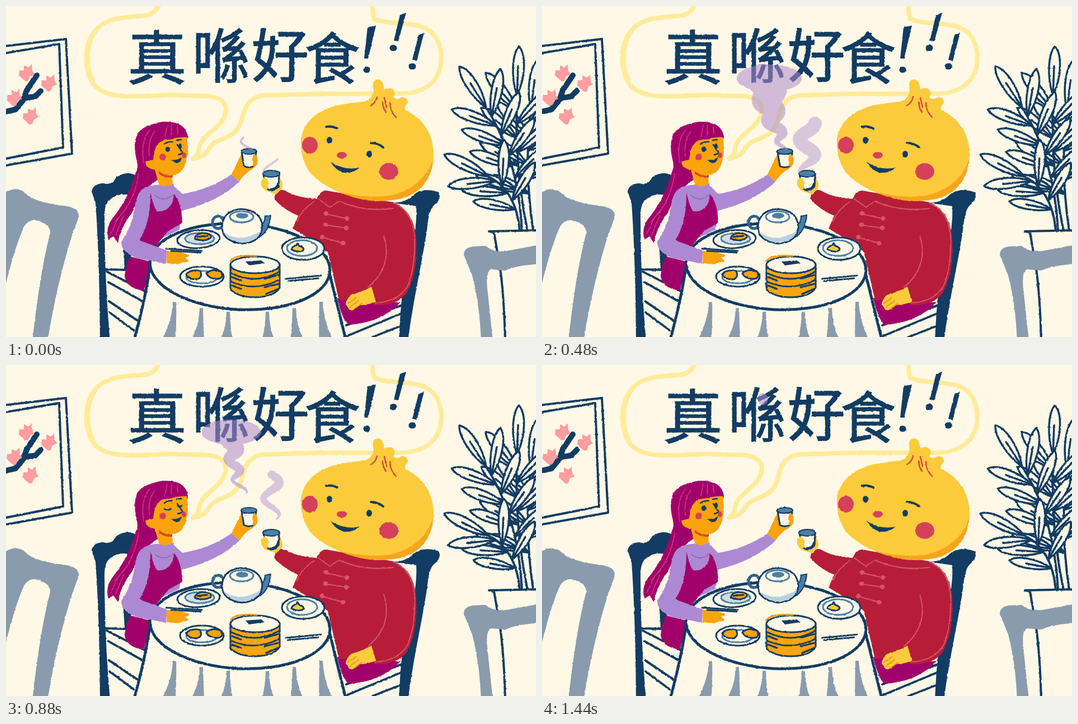
Write an HTML page that moves like this. It is 947 px wide and 592 px high and loops after 1.48 s.

```html
<!DOCTYPE html>
<html lang="zh-HK">
<head>
<meta charset="utf-8">
<title>Tea time</title>
<style>
  html, body { margin: 0; width: 100%; height: 100%; overflow: hidden; background: #fff8e6; }
  svg { display: block; width: 100vw; height: 100vh; }
  path, ellipse { stroke-linecap: round; stroke-linejoin: round; }
  .navy { fill: #123c63; }
  .grey { fill: #8a9bae; }
  .line { fill: none; stroke: #123c63; stroke-width: 4; }
  .paper { fill: #fff8e6; stroke: #123c63; stroke-width: 4; }
  .thin { stroke-width: 3; }
  .thick { stroke-width: 5; }
  .bubble { fill: none; stroke: #ffeb99; stroke-width: 8; }
  .skin { fill: #fba30a; }
  .bun { fill: #fccb3b; }
  .plum { fill: #a1006b; }
  .lilac { fill: #ad89d3; }
  .red { fill: #b71d38; }
  .seam { fill: none; stroke: #d5566b; stroke-width: 2; }
  .cheek { fill: #d6405a; }
  .blue { fill: #4c7fa6; }
  .steam { fill: #ae8bce; }
  text { font-family: "Noto Sans CJK HK", "Noto Sans CJK TC", "Noto Sans CJK JP", "Noto Sans CJK", sans-serif;
    fill: #123c63; stroke: #123c63; stroke-width: 1.5; text-anchor: middle; }
</style>
</head>
<body>
<svg viewBox="0 0 947 592" preserveAspectRatio="none">
  <defs>
    <filter id="rough" filterUnits="userSpaceOnUse" x="-10" y="-10" width="967" height="612" color-interpolation-filters="sRGB">
      <feTurbulence id="noise" type="fractalNoise" baseFrequency=".22" numOctaves="2" seed="1"/>
      <feDisplacementMap in="SourceGraphic" scale="2.6" xChannelSelector="R" yChannelSelector="G"/>
    </filter>
    <path id="blossom" fill="#ff9da0" d="M-1,15 L-13,4 L-12,-5 L-4,-5 L-4,-14 L4,-10 L10,-16 L11,-4 L15,2 L7,6 L4,14 Z"/>
  </defs>
  <g filter="url(#rough)">
    <!-- speech bubble -->
    <path class="bubble" d="M276,-8 Q268,14 250,17 C213,20 183,20 163,40 C138,65 138,115 158,142 C183,168 230,162 290,159 L355,161 C390,162 398,178 390,198 C380,222 345,232 345,258 Q343,268 334,273 C368,268 355,250 382,240 C424,226 418,205 428,182 Q437,163 460,160 L560,157 H700 C745,157 768,140 776,110 C782,80 773,52 750,40 C725,28 685,34 658,23 Q654,12 655,-8"/>
    <path class="bubble" d="M160,45 C142,68 142,105 154,132"/>
    <text x="270" y="131" font-size="105">真</text>
    <text x="384" y="129" font-size="104">喺</text>
    <text x="490" y="127" font-size="103">好</text>
    <text x="583" y="131" font-size="100">食</text>
    <path class="navy" d="M646,38 L661,35 L647,94 L640,94 Z M704,16 L715,12 L701,63 L693,62 Z M737,52 L747,48 L734,98 L726,96 Z"/>
    <path class="line" style="stroke-width:11" d="M644,114 h1 M691,75 h2 M725,108 h2"/>

    <!-- wall picture -->
    <path class="line" d="M-5,72 L107,59 L118,264 L-5,286 M-5,85 L95,68 L102,253 L-5,274"/>
    <path class="line" style="stroke-width:10" d="M-5,190 L17,185 L31,168 L37,151 L55,124 M36,164 L52,162 L62,152"/>
    <use href="#blossom" x="36" y="120"/><use href="#blossom" x="76" y="138"/>
    <use href="#blossom" x="14" y="164"/><use href="#blossom" x="43" y="197"/>

    <!-- plant -->
    <g id="plant"></g>
    <path class="paper" d="M863,403 L955,401 V600 H892 Q890,520 883,470 L872,405 Z"/>

    <!-- empty chairs -->
    <path class="grey" d="M-8,340 Q15,318 35,335 Q48,350 100,357 Q135,360 129,380 L118,410 Q90,500 74,600 H47 Q60,480 78,410 Q83,394 60,385 Q42,378 32,395 Q12,440 -8,530 Z"/>
    <path class="grey" d="M818,445 Q818,432 835,430 L857,429 Q872,443 900,437 L955,427 V461 Q910,464 893,473 L866,471 Q857,476 860,505 L870,600 H849 Q846,530 833,482 Z"/>

    <!-- occupied chairs -->
    <path class="navy" d="M153,332 Q155,318 174,317 Q190,322 197,306 Q222,290 240,310 L228,340 Q203,332 187,345 Q176,352 176,375 Q176,490 186,600 H168 Q167,450 160,352 Z M209,425 L224,440 L221,475 L212,470 Z"/>
    <path class="line" d="M178,471 L214,472 M180,475 L248,510 M183,494 L242,527 M184,528 L234,562 M185,548 L228,580"/>
    <path class="navy" d="M690,352 Q715,352 729,337 Q747,324 773,333 Q779,345 766,355 Q757,362 754,385 C748,440 728,520 718,600 H702 Q704,540 712,480 Q736,405 733,358 Z"/>
    <path class="line" d="M608,571 L708,535 M610,590 L706,550 M655,592 L706,572"/>

    <!-- woman -->
    <path class="plum" d="M236,285 Q225,250 235,228 Q250,208 292,208 Q322,210 325,238 L270,250 L272,310 Q240,330 225,370 Q205,395 200,424 L192,412 L183,418 Q177,398 190,380 Q215,350 228,310 Z"/>
    <path class="lilac" d="M245,327 Q265,315 300,322 L315,336 Q365,328 403,301 L417,314 Q380,350 314,366 L310,400 L255,427 L287,437 L286,461 L235,451 Q205,440 206,422 Q225,395 230,360 Q234,333 245,327 Z"/>
    <path class="plum" d="M258,333 Q263,358 270,367 Q288,370 298,350 L300,336 Q314,352 315,388 L290,402 L262,436 L239,418 Q259,385 258,333 Z M222,448 L262,458 L246,509 Q215,505 212,483 Q214,463 222,448 Z"/>
    <path class="skin" d="M262,240 L323,234 Q327,260 323,272 Q319,300 297,303 L298,318 Q283,327 273,318 L266,293 Q249,290 249,279 Q253,270 261,275 Z"/>
    <path fill="#d64a2a" d="M273,295 Q285,305 298,303 L298,307 Q282,308 273,300 Z"/>
    <path class="lilac" d="M266,320 Q283,327 300,317 L298,340 Q280,352 266,340 Z"/>
    <path fill="none" stroke="#8f62b8" stroke-width="1.5" d="M266,338 Q282,352 298,338"/>
    <path class="plum" d="M233,262 Q228,215 280,207 Q322,205 325,235 L309,233 L299,238 L281,240 Q265,245 263,275 L249,278 L252,300 L236,302 Z"/>
    <path fill="none" stroke="#d23c78" stroke-width="1.5" d="M288,213 L284,234 M296,213 L295,231 M306,216 L307,228 M266,224 Q253,240 256,268 M257,222 Q240,240 246,280 M237,300 Q230,345 207,372 M230,330 Q220,360 194,386 M210,375 L196,410 M200,380 L187,408"/>
    <path class="line" style="stroke-width:2.5" d="M283,247 Q289,242 297,243 M305,240 L313,239 M306,248 L316,263 L308,266"/>
    <path class="navy" d="M294,275 Q303,277 314,271 Q313,281 304,281 Z"/>
    <ellipse class="cheek" cx="280" cy="270" rx="6" ry="6"/>
    <ellipse class="cheek" cx="318" cy="267" rx="4" ry="5"/>
    <g id="open"><ellipse class="navy" cx="289" cy="256" rx="4" ry="5"/><ellipse class="navy" cx="311" cy="251" rx="3" ry="5"/></g>
    <path id="closed" class="line" style="stroke-width:2.5" d="M283,257 Q289,262 295,257 M307,252 Q311,256 315,251"/>
    <path class="skin" d="M403,301 Q410,287 416,274 L422,262 L442,261 Q449,264 449,275 Q451,286 438,293 Q425,301 417,314 Z"/>
    <path class="paper thin" d="M421,261 L447,261 L444,286 Q433,291 425,286 Z"/>
    <ellipse class="blue" cx="434" cy="260" rx="14" ry="5" stroke="#123c63" stroke-width="2"/>
    <path class="skin" d="M443,265 Q450,266 449,275 Q451,284 443,288 Q439,284 442,279 Q438,275 443,265 Z"/>

    <!-- bun guest -->
    <path class="plum" d="M592,522 L655,528 L705,530 Q670,567 612,570 Q600,560 592,522 Z"/>
    <path class="red" d="M482,334 Q490,326 500,331 Q520,343 555,345 Q560,332 572,330 L692,351 Q728,365 733,415 Q736,480 715,515 Q695,538 657,535 L654,506 Q625,526 595,526 L575,440 Q550,420 512,398 L522,375 Q497,365 479,345 Z"/>
    <path class="bun" d="M527,237 Q535,193 590,178 Q625,172 640,171 Q655,166 657,151 Q652,132 665,131 Q677,134 675,150 Q680,145 690,148 Q697,154 692,164 Q700,169 707,163 Q718,163 718,173 Q711,180 713,186 C755,205 770,245 762,287 C752,332 710,350 660,349 C620,346 570,327 545,300 Q525,275 527,237 Z"/>
    <path fill="#f5a51c" d="M763,275 Q758,330 705,345 Q645,356 594,332 Q640,345 687,339 Q745,325 763,275 Z"/>
    <path fill="none" stroke="#d94a45" stroke-width="2.5" d="M663,163 Q660,174 652,178 M673,172 Q673,181 679,190 M676,164 L680,181 M686,173 Q686,188 697,199"/>
    <ellipse class="cheek" cx="543" cy="249" rx="14" ry="15"/>
    <ellipse class="cheek" cx="684" cy="296" rx="17" ry="15"/>
    <ellipse class="cheek" cx="600" cy="267" rx="9" ry="6"/>
    <ellipse class="navy" cx="578" cy="240" rx="5" ry="6"/>
    <ellipse class="navy" cx="649" cy="265" rx="5" ry="6"/>
    <path class="line" d="M572,216 Q582,214 592,219 M652,245 Q665,245 674,253"/>
    <path class="navy" d="M580,279 Q604,295 632,289 Q620,300 603,298 Q588,293 580,279 Z"/>
    <path class="red" d="M558,344 Q560,331 572,330 Q592,338 605,350 Q650,358 692,351 L691,366 Q645,366 610,357 L595,349 L579,360 Z"/>
    <path class="seam" d="M558,345 L579,360 L595,349 Q640,369 692,362 M550,350 Q528,365 520,385 M675,411 Q692,465 647,503 M692,352 Q725,365 730,410 Q732,465 718,500 Q702,528 662,531 M650,505 L660,532 M568,371 L612,381 M568,391 L612,398 M562,413 L606,425"/>
    <path class="seam" style="stroke-width:8" d="M572,371 h.1 M609,380 h.1 M571,391 h.1 M608,397 h.1 M565,413 h.1 M602,424 h.1"/>
    <path class="bun" d="M653,502 L661,529 Q645,535 633,535 L620,544 Q612,545 611,539 L607,534 Q607,526 616,517 Q635,512 653,502 Z"/>
    <path fill="none" stroke="#e89512" stroke-width="2" d="M611,532 L625,522 M614,539 L630,527 M622,542 L636,532"/>
    <path class="bun" d="M463,305 Q455,310 456,320 Q460,331 472,333 L483,337 L493,326 Q496,315 488,306 Z"/>
    <path class="paper thin" d="M460,302 L488,302 L487,323 Q475,335 466,326 Z"/>
    <path class="line" d="M486,318 Q484,328 473,328"/>
    <ellipse class="blue" cx="474" cy="300" rx="15" ry="6" stroke="#123c63" stroke-width="2"/>
    <path class="bun" d="M460,307 Q467,307 467,312 Q472,316 468,321 Q471,327 464,328 Q455,322 456,313 Z"/>

    <!-- table -->
    <path class="paper thick" d="M258,462 Q248,530 228,600 H608 Q592,535 578,478 Z"/>
    <g id="folds" class="grey"></g>
    <ellipse class="paper thick" cx="418" cy="466" rx="161" ry="77" transform="rotate(3 418 466)"/>
    <g class="paper thin">
      <ellipse cx="344" cy="417" rx="38" ry="16" transform="rotate(-4 344 417)"/>
      <ellipse cx="346" cy="416" rx="26" ry="10" fill="#d3dde2" stroke="#4c7fa6"/>
      <path class="skin" d="M338,417 Q336,409 350,406 Q368,406 366,414 Q358,422 338,417 Z M342,413 L360,411"/>
      <ellipse cx="531" cy="434" rx="38" ry="20"/>
      <ellipse cx="529" cy="433" rx="27" ry="14" stroke="#4c7fa6"/>
      <path class="bun" d="M510,435 Q512,429 519,428 L521,424 L524,429 Q534,432 531,437 Q520,442 510,435 Z"/>
      <ellipse cx="350" cy="484" rx="39" ry="18"/>
      <ellipse cx="350" cy="485" rx="28" ry="11" stroke="#4c7fa6"/>
      <path class="skin" d="M322,480 Q330,470 347,474 Q352,486 341,489 Q326,489 322,480 Z M358,478 Q368,469 384,475 Q390,485 380,488 Q363,489 358,478 Z"/>
    </g>

    <!-- teapot -->
    <ellipse cx="379" cy="387" rx="10" ry="11" fill="none" stroke="#2e638d" stroke-width="5"/>
    <path class="blue" stroke="#123c63" stroke-width="2" d="M450,394 Q462,392 463,376 L473,374 Q470,405 451,414 Z"/>
    <path class="paper thin" d="M386,395 Q387,366 420,363 Q455,365 458,393 Q457,423 421,425 Q386,420 386,395 Z"/>
    <path fill="#b9cfdf" d="M388,404 Q418,426 456,402 Q449,422 421,423 Q395,420 388,404 Z"/>
    <ellipse cx="421" cy="377" rx="21" ry="10" fill="#fff8e6" stroke="#4c7fa6" stroke-width="3"/>
    <ellipse class="blue" cx="422" cy="375" rx="11" ry="5"/>

    <!-- steamer basket -->
    <path fill="#faa50f" stroke="#123c63" stroke-width="3" d="M401,463 V507 Q415,521 446,521 Q479,520 489,504 V463 Z"/>
    <path class="line thin" d="M401,477 Q445,500 489,475 M402,493 Q445,512 488,490 M462,488 L487,481 M462,503 L487,497 M465,515 L486,506 M404,485 L420,491 M404,500 L420,506"/>
    <ellipse cx="445" cy="463" rx="44" ry="15" fill="#fff8e6" stroke="#123c63" stroke-width="3"/>
    <path class="navy" d="M428,457 L456,455 L462,460 L434,464 Z"/>
    <path fill="none" stroke="#f29a18" stroke-width="3" d="M401,457 Q407,444 448,447"/>
    <path class="line thin" d="M500,488 L563,482 M504,492 L558,487"/>

    <!-- hand with chopsticks -->
    <path class="skin" d="M287,438 L311,440 L327,445 Q328,449 320,450 L326,455 Q324,459 317,458 L308,462 L287,460 Z"/>
    <path class="line thin" d="M286,434 L350,438 M295,438 L348,441"/>
    <path class="lilac" d="M213,410 L287,437 L286,461 L235,451 Q208,442 207,421 Z"/>

    <g opacity=".56"><path id="steamA" class="steam"/><ellipse id="cap" class="steam"/></g>
    <path id="steamB" class="steam" opacity=".46"/>
  </g>
</svg>
<script>
const $ = id => document.getElementById(id);
const LOOP = 1480;
const smooth = u => { u = Math.min(1, Math.max(0, u)); return u * u * (3 - 2 * u); };

function leaf(x, y, angle, length) {
  const point = (along, out) => {
    const a = along * length, o = out * length;
    return `${x + a * Math.cos(angle) - o * Math.sin(angle)},${y + a * Math.sin(angle) + o * Math.cos(angle)}`;
  };
  return `<path class="paper" style="stroke-width:3.5" d="M${x},${y} C${point(.4, .17)} ${point(.85, .15)} ${point(1, 0)}
    C${point(.85, -.12)} ${point(.4, -.15)} ${x},${y} L${point(.6, 0)}"/>`;
}

// a bent stem with leaves fanning out on alternate sides up to its tip
function stem(x0, y0, cx, cy, x1, y1, count) {
  let art = `<path class="line" d="M${x0},${y0} Q${cx},${cy} ${x1},${y1}"/>`;
  for (let i = 0; i < count; i++) {
    const u = .3 + .7 * i / (count - 1), v = 1 - u, side = i % 2 ? 1 : -1;
    const x = v * v * x0 + 2 * u * v * cx + u * u * x1;
    const y = v * v * y0 + 2 * u * v * cy + u * u * y1;
    const along = Math.atan2(v * (cy - y0) + u * (y1 - cy), v * (cx - x0) + u * (x1 - cx));
    const spread = i === count - 1 ? 0 : side * (1.25 - .6 * u);
    art += leaf(x, y, along + spread, 72 + 16 * u);
  }
  return art;
}
$('plant').innerHTML = stem(942, 402, 925, 290, 938, 185, 7) + stem(932, 403, 908, 290, 913, 160, 8)
  + stem(922, 403, 915, 270, 858, 182, 9) + stem(918, 403, 912, 330, 862, 305, 6);

// cloth folds hang from the table edge and flare outwards
for (const side of [-1, 1]) for (let k = 0; k < 3; k++) {
  const dx = side * (35 + 48 * k), x = 432 + dx, y = 548 - dx * dx / 900, foot = x + dx * .08;
  $('folds').innerHTML += `<path d="M${x - 3},${y} Q${x - 4},${y + 35} ${foot - 14},600 H${foot + 12} Q${x + 4},${y + 35} ${x + 3},${y} Z"/>`;
}

// overlapping discs on a swaying column; wear thins it until only wisps remain
function plume({ top, tail, spine, sway, wave, crest, slope, widest }, grow, wear) {
  let d = '';
  for (let y = top; y <= tail; y++) {
    const swing = Math.cos((y - crest) * 2 * Math.PI / wave);
    const x = spine(y) + sway * swing;
    const full = Math.min(widest, 2 + slope * (tail - y) * grow);
    const r = full * (1 - wear * (1.2 - .3 * swing));
    if (r > .5) d += `M${x - r},${y}a${r},${r} 0 1 0 ${2 * r},0a${r},${r} 0 1 0 ${-2 * r},0`;
  }
  return d;
}

function draw(t) {
  const grow = smooth((t - 120) / 400), wear = Math.max(0, (t - 640) / 700);
  const top = 236 - 110 * grow - 50 * wear * wear;
  const tall = {
    top, tail: 256 - 78 * wear, spine: y => 402 + 30 * (Math.max(0, y - 130) / 120) ** 2,
    sway: 9, wave: 37.5, crest: 188, slope: .23, widest: 26
  };
  const small = {
    top: 274 - 66 * grow - 36 * wear, tail: 298 - 65 * wear, spine: () => 474,
    sway: 14, wave: 58, crest: 268, slope: .3, widest: 12
  };
  $('steamA').setAttribute('d', plume(tall, grow, wear));
  $('steamB').setAttribute('d', plume(small, grow, wear));

  const rx = 60 * grow * Math.max(.15, 1 - wear * wear);
  const cap = { cx: 406 + 10 * (1 - grow) - 10 * wear, cy: top, rx, ry: 8 + .28 * rx };
  for (const name in cap) $('cap').setAttribute(name, cap[name]);

  const blink = t >= 800 && t < 1000;
  $('open').style.display = blink ? 'none' : '';
  $('closed').style.display = blink ? '' : 'none';
  $('noise').setAttribute('seed', 1 + Math.floor(t / 80) % 4);
}

let shown = -1;
function frame() {
  const t = Math.floor(performance.now() % LOOP / 40) * 40;
  if (t !== shown) draw(shown = t);
  requestAnimationFrame(frame);
}
frame();
</script>
</body>
</html>
```
